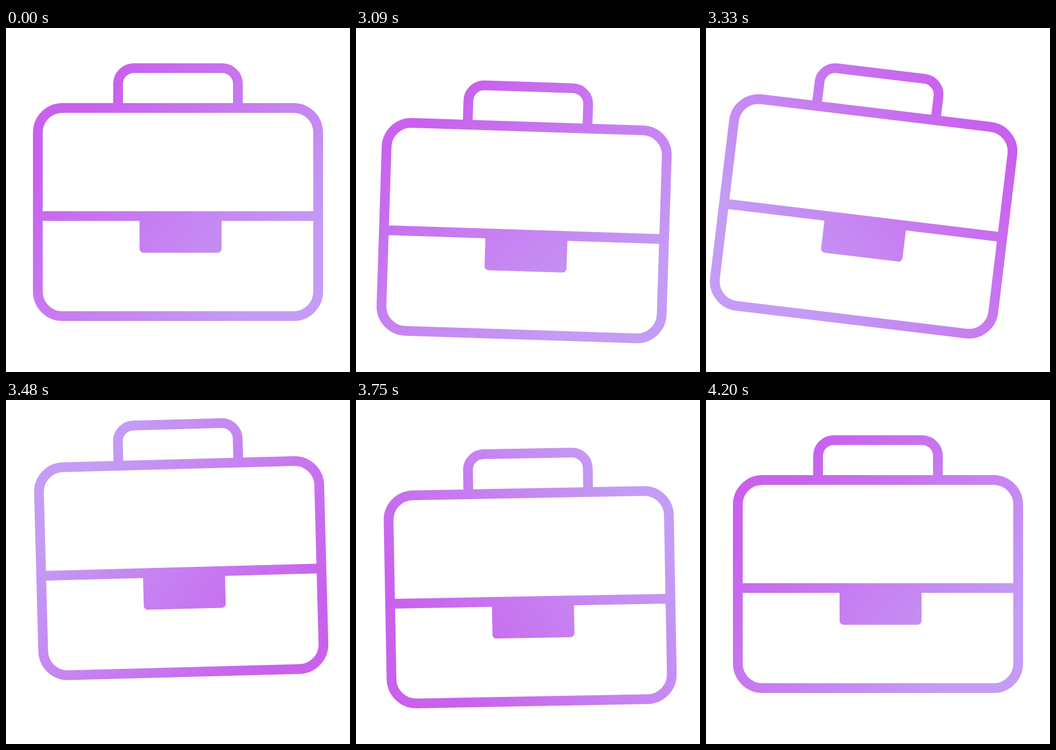
These frames come from a looping animation (600x600 px, 4.23 s). An HTML page with a canvas:

```html
<!DOCTYPE html>
<html lang="en">
<head>
<meta charset="utf-8">
<title>Briefcase</title>
<style>
  html, body { margin: 0; width: 100%; height: 100%; overflow: hidden; background: #fff; }
  canvas { display: block; width: 600px; height: 600px; }
</style>
</head>
<body>
<canvas id="stage" width="600" height="600"></canvas>
<script>
const ctx = document.getElementById('stage').getContext('2d');
const LOOP = 4230, START = 3000, STEP = 30;
const PIVOT = { x: 300, y: 112 };
const DARK = '#c961ed', LIGHT = '#c49cf5';

// Easing curve with flat ends; a and b are the handle lengths in time.
function ease(a, b) {
  return x => {
    let lo = 0, hi = 1;
    for (let i = 0; i < 24; i++) {
      const s = (lo + hi) / 2, r = 1 - s;
      if (3 * a * s * r * r + 3 * (1 - r) * s * b * r + s * s * s < x) lo = s;
      else hi = s;
    }
    return lo * lo * (3 - 2 * lo);
  };
}
const smooth = ease(1 / 3, 2 / 3);

// Keys: [ms after START, value, easing towards this key]
const drop = [[0, 0], [170, 57, ease(.28, .667)], [465, -28, smooth], [775, 24, smooth], [1103, 0, smooth]];
const tilt = [[0, 0], [300, 7.2, ease(.37, .45)], [600, -7.2, ease(.38, .7)], [900, 5.1, smooth], [1200, 0, smooth]];
const sweep = [[0, 42], [1200, 402, ease(.24, .52)]];

function valueAt(keys, t) {
  if (t <= 0) return keys[0][1];
  for (let i = 1; i < keys.length; i++) {
    const [t0, v0] = keys[i - 1], [t1, v1, curve] = keys[i];
    if (t < t1) return v0 + (v1 - v0) * curve((t - t0) / (t1 - t0));
  }
  return keys[keys.length - 1][1];
}

const rad = deg => deg * Math.PI / 180;

function shade(deg) {
  const dx = 225 * Math.cos(rad(deg)), dy = 225 * Math.sin(rad(deg));
  const g = ctx.createLinearGradient(300 - dx, 300 - dy, 300 + dx, 300 + dy);
  g.addColorStop(0, DARK);
  g.addColorStop(1, LIGHT);
  return g;
}

function outline() {
  ctx.roundRect(55.5, 139.5, 489, 363, 43);
  ctx.moveTo(55.5, 328);
  ctx.lineTo(544.5, 328);
  ctx.moveTo(195.5, 139.5);
  ctx.arcTo(195.5, 70, 300, 70, 27.5);
  ctx.arcTo(404.5, 70, 404.5, 139.5, 27.5);
  ctx.lineTo(404.5, 139.5);
}

function clasp() {
  ctx.roundRect(233, 322, 143, 70, [0, 0, 7, 7]);
}

// Only the shapes move with the case; the gradient stays on the stage.
function trace(shape, y, deg) {
  ctx.beginPath();
  ctx.translate(PIVOT.x, PIVOT.y + y);
  ctx.rotate(rad(deg));
  ctx.translate(-PIVOT.x, -PIVOT.y);
  shape();
  ctx.resetTransform();
}

function draw(time) {
  const t = Math.floor(time % LOOP / STEP) * STEP - START;
  const y = valueAt(drop, t), deg = valueAt(tilt, t);
  ctx.fillStyle = '#fff';
  ctx.fillRect(0, 0, 600, 600);
  ctx.fillStyle = ctx.strokeStyle = shade(valueAt(sweep, t));
  ctx.lineWidth = 17;
  trace(outline, y, deg);
  ctx.stroke();
  trace(clasp, y, deg);
  ctx.fill();
}

const begin = performance.now();
function tick() {
  draw(performance.now() - begin);
  requestAnimationFrame(tick);
}
tick();
</script>
</body>
</html>
```
